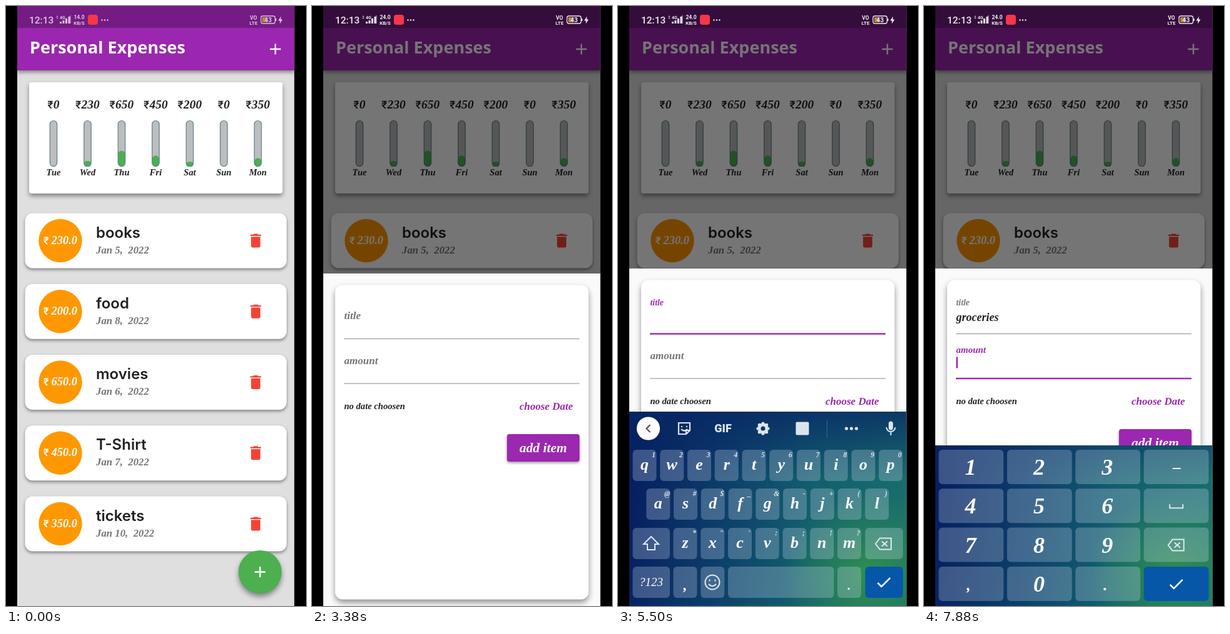
An HTML page with a canvas for the animation above (8 s loop, 480 px wide and 960 px high).

```html
<!DOCTYPE html>
<html lang="en">
<head>
<meta charset="utf-8">
<title>Personal Expenses</title>
<style>
html, body { margin: 0; width: 100%; height: 100%; overflow: hidden; background: #000; }
canvas { display: block; }
</style>
</head>
<body>
<canvas id="stage" width="480" height="960"></canvas>
<script>
const ctx = document.getElementById('stage').getContext('2d');
const LOOP = 8000, TICK = 125;
const LEFT = 18, WIDTH = 443.5;
const PURPLE = '#9c27b0', GREEN = '#4caf50', BLUE = '#0757a8', INK = '#212121';
const DP = 1.23;

const script = (size, weight = 'bold') => `italic ${weight} ${size}px "Liberation Serif", serif`;
const roboto = (size, weight = 500) => `${weight} ${size}px Roboto, sans-serif`;

const items = [
  ['books', 230, 'Jan 5,  2022'], ['food', 200, 'Jan 8,  2022'], ['movies', 650, 'Jan 6,  2022'],
  ['T-Shirt', 450, 'Jan 7,  2022'], ['tickets', 350, 'Jan 10,  2022']
];
const days = [['Tue', 0], ['Wed', 230], ['Thu', 650], ['Fri', 450], ['Sat', 200], ['Sun', 0], ['Mon', 350]];
const total = days.reduce((sum, day) => sum + day[1], 0);

// [letters, hints, left edge, top offset]
const keyRows = [
  ['qwertyuiop', '1234567890', 23.5, 61],
  ['asdfghjkl', '@#$_&-+()', 45.3, 123],
  ['zxcvbnm', '*"\':;!?', 88.5, 186]
];
const PITCH = 43.75, KEY_W = 38, KEY_H = 50;

// [time, text, pressed key]
const typing = [
  [0, '', ''], [5750, '', 'g'], [5875, 'g', 'r'], [6000, 'gr', ''], [6375, 'gr', 'o'],
  [6500, 'gro', ''], [6750, 'gro', 'c'], [6875, 'groc', ''], [7250, 'groceries', '']
];
const suggestions = {
  g: ['g', 'good', 'go'], gr: ['gr', 'grocery', 'groups'], gro: ['gro', 'grocery', 'groups'],
  groc: ['groc', 'groceries', 'grocery'], groceries: ['and', 'for', 'list']
};

const clamp = v => Math.max(0, Math.min(1, v));

function text(str, x, y, font, color, align = 'left') {
  ctx.font = font;
  ctx.fillStyle = color;
  ctx.textAlign = align;
  ctx.fillText(str, x, y);
}

// Centred amount with an upright currency sign
function money(amount, x, y, size, color, gap = 0) {
  const signFont = roboto(size * .88);
  ctx.font = signFont;
  const signWidth = ctx.measureText('₹').width + gap;
  ctx.font = script(size);
  const left = x - (signWidth + ctx.measureText(amount).width) / 2;
  text('₹', left, y, signFont, color);
  text(amount, left + signWidth, y, script(size), color);
}

function rect(x, y, w, h, color) {
  ctx.fillStyle = color;
  ctx.fillRect(x, y, w, h);
}

function box(x, y, w, h, r, fill, stroke, lineWidth = 1) {
  ctx.beginPath();
  ctx.roundRect(x, y, w, h, r);
  if (fill) { ctx.fillStyle = fill; ctx.fill(); }
  if (stroke) { ctx.strokeStyle = stroke; ctx.lineWidth = lineWidth; ctx.stroke(); }
}

function disc(x, y, r, fill, stroke, lineWidth = 1) {
  box(x - r, y - r, 2 * r, 2 * r, r, fill, stroke, lineWidth);
}

function raised(blur, dy, draw) {
  ctx.save();
  ctx.shadowColor = 'rgba(0,0,0,.42)';
  ctx.shadowBlur = blur;
  ctx.shadowOffsetY = dy;
  draw();
  ctx.restore();
}

function icon(x, y, path, color, { scale = 1, stroke = 0 } = {}) {
  ctx.save();
  ctx.translate(x, y);
  ctx.scale(scale, scale);
  const shape = new Path2D(path);
  if (stroke) {
    ctx.strokeStyle = color;
    ctx.lineWidth = stroke;
    ctx.stroke(shape);
  } else {
    ctx.fillStyle = color;
    ctx.fill(shape);
  }
  ctx.restore();
}

const plus = (x, y, color) => icon(x, y, 'M-8.6 0H8.6M0-8.6V8.6', color, { stroke: 2.4 });
const trash = (x, y, color) => icon(x, y,
  'M-6 7c0 1.1.9 2 2 2h8c1.1 0 2-.9 2-2V-5H-6zM7-8H3.5l-1-1h-5l-1 1H-7v2H7z', color, { scale: DP });
const check = (x, y) => icon(x, y, 'M-10 1L-4 7L10-7', '#fff', { stroke: 2.6 });
const backspace = (x, y) => icon(x, y, 'M-13 0L-6-9H12V9H-6zM-3-4L6 4M6-4L-3 4', '#dfe7ee', { stroke: 2 });

function statusBar(t, dimmed) {
  const ink = dimmed ? '#f2eaf4' : '#dcc6e0';
  text('12:13', 37, 28, roboto(15.5), ink);
  icon(82, 18, 'M-2-1L0-3L2-1zM-2 1L0 3L2 1z', ink, { scale: .8 });
  text('4G', 86, 20.5, roboto(7, 700), ink);
  [3, 5, 8, 11].forEach((h, i) => rect(86 + i * 4.5, 28 - h, 3, h, ink));
  ctx.globalAlpha = .4;
  rect(101.5, 15, 2.5, 13, ink);
  ctx.globalAlpha = 1;
  text(t < 750 ? '14.0' : '24.0', 117, 21, roboto(8.5, 700), ink, 'center');
  text('KB/S', 117, 29.5, roboto(7.8, 700), ink, 'center');
  box(131, 14, 16, 16, 4, '#f6364a');
  [153.5, 158, 162.5].forEach(x => disc(x, 22.5, 1.2, ink));
  text('VO', 396, 21.5, roboto(8.5, 700), ink, 'center');
  text('LTE', 396, 29.5, roboto(8, 700), ink, 'center');
  box(408, 16, 22.5, 12, 3, null, ink, 1.3);
  box(410, 18, 7, 8, 1, '#b58a3c');
  rect(431, 20, 1.6, 4, ink);
  text('43', 419.5, 26, roboto(10, 700), ink, 'center');
  icon(439, 22.5, 'M1-6L-3.5 1H-.5L-1 6L3.5-1H.5z', ink);
}

function chart() {
  raised(7, 4, () => box(37, 122, 405.5, 178, 4, '#fff'));
  days.forEach(([name, amount], i) => {
    const x = 76 + i * 54.5;
    money(amount, x, 164, 19.5, INK);
    box(x - 5.7, 183.5, 11.4, 73, 5.7, '#bdbdbd');
    const h = 74 * amount / total;
    if (h) box(x - 5.7, 257 - h, 11.4, h, Math.min(5.7, h / 2), GREEN);
    box(x - 5.7, 183.5, 11.4, 73, 5.7, null, '#56808f', 1.2);
    text(name, x, 270.5, script(14.5), INK, 'center');
  });
}

function homePage(t) {
  rect(LEFT, 0, WIDTH, 960, '#dfdfdf');
  chart();
  items.forEach(([title, amount, date], i) => {
    const y = 331.5 + i * 113.25;
    raised(5, 2.5, () => box(30.5, y, 418.5, 88, 12, '#fff'));
    disc(87, y + 44, 34.7, '#ff9800');
    money(`${amount}.0`, 87, y + 49, 18.5, '#fff', 4);
    text(title, 144, y + 39, '600 24px Inter, sans-serif', INK);
    text(date, 144, y + 64, script(16.8), '#757575');
    trash(399.5, y + 44, '#f44336');
  });

  const glow = t >= 1125 && t <= 1875 ? Math.sin(Math.PI * (t - 1000) / 1000) : 0;
  if (glow) {
    ctx.fillStyle = `rgba(255,255,255,${.15 * glow})`;
    ctx.beginPath();
    ctx.ellipse(240, 960, 270, 36 * glow, 0, 0, 2 * Math.PI);
    ctx.fill();
  }

  raised(8, 5, () => disc(406.5, 905.5, 34.6, GREEN));
  if (t >= 3125) disc(406.5, 905.5, 34.6, 'rgba(255,255,255,.2)');
  plus(406.5, 905.5, '#fff');

  raised(6, 3, () => rect(LEFT, 35, WIDTH, 68, '#9b26af'));
  rect(LEFT, 0, WIDTH, 35, '#741c83');
  text('Personal Expenses', 38, 76, 'bold 27px "Open Sans", sans-serif', '#fff');
  plus(431, 69, '#fff');
}

function field(label, y, value, { focused, float, cursor, composing }) {
  const size = 17 - 3.2 * float;
  text(label, 51.5, y - 31 - 14.5 * float, script(size), focused ? PURPLE : '#757575');
  text(value, 51.5, y - 20, script(18), INK);
  const end = 52 + ctx.measureText(value).width;
  if (composing) rect(51.5, y - 17, end - 52, 1, INK);
  if (cursor) rect(end - .5, y - 34, 2.5, 18, PURPLE);
  const thick = focused ? 2.4 : 1;
  rect(51, y + .5 - thick / 2, 377, thick, focused ? PURPLE : '#8c8c8c');
}

function sheet(t, top, entry) {
  rect(LEFT, top, WIDTH, 960 - top, '#fafafa');
  raised(10, 5, () => box(37, top + 18.5, 405.5, 503, 12, '#fff'));
  const onAmount = t >= 7875, onTitle = t >= 4625 && !onAmount;
  const blinkOff = (t >= 5500 && t < 5750) || (t >= 7625 && t < 7875);
  field('title', top + 104, entry, {
    focused: onTitle, float: clamp((t - 4625) / 200),
    cursor: onTitle && !blinkOff, composing: entry && t < 7250
  });
  field('amount', top + 175.5, '', {
    focused: onAmount, float: onAmount ? clamp((t - 7750) / 200) : 0, cursor: onAmount
  });
  text('no date choosen', 51.5, top + 216.5, script(14.6), INK);
  text('choose Date', 332, top + 217.5, script(17), PURPLE);
  raised(4, 2, () => box(312, top + 257, 116, 44, 4, PURPLE));
  text('add item', 370, top + 285.5, script(21.5), '#fff', 'center');
}

function keyboardBackground(top) {
  const h = 311;
  const base = ctx.createLinearGradient(LEFT, top + 150, 462, top + 200);
  base.addColorStop(0, '#061f60');
  base.addColorStop(.35, '#0d406a');
  base.addColorStop(.65, '#135f6e');
  base.addColorStop(1, '#196e6c');
  rect(LEFT, top, WIDTH, h, base);
  const shade = ctx.createLinearGradient(0, top, 0, top + 110);
  shade.addColorStop(0, 'rgba(7,38,100,.75)');
  shade.addColorStop(1, 'rgba(7,38,100,0)');
  rect(LEFT, top, WIDTH, 110, shade);
  const spot = ctx.createRadialGradient(400, top + 262, 5, 400, top + 262, 135);
  spot.addColorStop(0, 'rgba(52,150,74,.8)');
  spot.addColorStop(1, 'rgba(52,150,74,0)');
  rect(LEFT, top, WIDTH, h, spot);
}

const key = (x, y, w, h = KEY_H, fill = 'rgba(205,222,240,.27)') => box(x, y, w, h, 6, fill);

function toolbar(y, entry, picked) {
  const ink = '#dbe4ec';
  disc(48.5, y, 18.6, '#fff');
  icon(48.5, y, entry ? 'M-3-6L3 0L-3 6' : 'M3-6L-3 0L3 6', '#555', { stroke: 2.2 });
  icon(436.5, y, 'M-3.5-8a3.5 3.5 0 0 1 7 0V-1a3.5 3.5 0 0 1-7 0z', ink);
  icon(436.5, y, 'M-7-2a7 7 0 0 0 14 0M0 5V11', ink, { stroke: 2 });
  if (entry) {
    if (picked) box(180, y - 22, 117, 44, 6, 'rgba(255,255,255,.15)');
    [120, 238, 362].forEach((x, i) =>
      text(suggestions[entry][i], x, y + 7, script(20.5), '#fff', 'center'));
    [175.5, 301].forEach(x => rect(x, y - 14, 1, 28, 'rgba(255,255,255,.2)'));
    return;
  }
  icon(106, y, 'M-9-9H9V3L3 9H-9zM9 3H3V9M-4-4v2M4-4v2M-5 1Q0 6 5 1', ink, { stroke: 2.2 });
  text('GIF', 168, y + 6, roboto(18, 900), ink, 'center');
  for (let i = 0; i < 8; i++) {
    const a = i * Math.PI / 4;
    disc(232 + 8 * Math.cos(a), y + 8 * Math.sin(a), 2.6, ink);
  }
  disc(232, y, 6, null, ink, 5);
  box(284.5, y - 10.5, 21, 21, 2, ink);
  rect(334, y - 14, 1, 28, 'rgba(255,255,255,.2)');
  [365.5, 373.5, 381.5].forEach(x => disc(x, y, 2.6, ink));
}

function popup(letter, hint, x, y) {
  const fill = ctx.createLinearGradient(0, y - 87, 0, y + KEY_H);
  fill.addColorStop(0, '#5b7b92');
  fill.addColorStop(1, '#50809a');
  raised(4, 1, () => box(x - 4, y - 87, KEY_W + 8, 137, 5, fill));
  text(letter, x + KEY_W / 2, y - 42, script(26), '#fff', 'center');
  text(hint, x + 29, y - 25, script(15), '#fff', 'center');
}

function letterKeyboard(top, alpha, entry, pressed, picked) {
  ctx.globalAlpha = alpha;
  keyboardBackground(top);
  ctx.globalAlpha = 1;
  toolbar(top + 27, entry, picked);

  const third = top + 186, last = top + 248;
  key(23.5, third, 59.5);
  icon(53, third + 25, 'M0-11L12 1H6V10H-6V1H-12z', '#dfe7ee', { stroke: 2 });
  key(395.5, third, 60.5);
  backspace(425, third + 25.5);
  key(23.5, last, 59.5);
  text('?123', 53, last + 31, script(19, 'normal'), '#fff', 'center');
  key(88.5, last, KEY_W);
  text(',', 107.5, last + 37, script(24), '#fff', 'center');
  key(132.3, last, KEY_W);
  disc(151, last + 25, 11.5, null, '#dfe7ee', 2);
  icon(151, last + 25, 'M-4.5-4.5v3M4.5-4.5v3M-6 3Q0 9.5 6 3', '#dfe7ee', { stroke: 2 });
  key(176, last, 169.5);
  key(351, last, KEY_W);
  text('.', 370, last + 37, script(22), '#fff', 'center');
  key(395.5, last, 60.5, KEY_H, BLUE);
  check(425.5, last + 25);

  let raisedKey;
  for (const [letters, hints, left, offset] of keyRows) {
    [...letters].forEach((letter, i) => {
      const x = left + i * PITCH, y = top + offset;
      key(x, y, KEY_W);
      text(letter, x + KEY_W / 2, y + 32, script(26), '#fff', 'center');
      text(hints[i], x + KEY_W - 4.5, y + 12, script(11.5), '#dde6ee', 'center');
      if (letter === pressed) raisedKey = [letter, letter === 'o' ? '.' : hints[i], x, y];
    });
  }
  if (raisedKey) popup(...raisedKey);
}

function numberPad() {
  ctx.save();
  ctx.beginPath();
  ctx.rect(LEFT, 703, WIDTH, 257);
  ctx.clip();
  keyboardBackground(649);
  ['123-', '456_', '789<', ',0.>'].forEach((row, r) => [...row].forEach((label, c) => {
    const x = 23.5 + c * 109.4, y = 710 + r * 62.3, cx = x + 52, cy = y + 28;
    key(x, y, 103.8, 55, label === '>' ? BLUE : undefined);
    if (label === '>') check(cx, cy);
    else if (label === '<') backspace(cx, cy);
    else if (label === '_') icon(cx, cy, 'M-10.5-3V3H10.5V-3', '#dfe7ee', { stroke: 2 });
    else if (label === '-') icon(cx, cy, 'M-6 2H7', '#fff', { stroke: 2.2 });
    else if (label === '.' || label === ',') text(label, cx - 4, cy + 10, script(26), '#fff', 'center');
    else text(label, cx - 1, cy + 12, script(36), '#fff', 'center');
  }));
  ctx.restore();
}

function draw(t) {
  rect(0, 0, 480, 960, '#000');
  ctx.save();
  ctx.beginPath();
  ctx.rect(LEFT, 0, WIDTH, 960);
  ctx.clip();

  const open = t >= 3375;
  homePage(t);
  if (open) rect(LEFT, 0, WIDTH, 960, 'rgba(0,0,0,.54)');
  statusBar(t, open);

  if (open) {
    const [, entry, pressed] = typing.filter(step => t >= step[0]).pop();
    sheet(t, t < 3500 ? 428 : 420, entry);
    if (t >= 7875) {
      numberPad();
    } else if (t >= 4625) {
      const p = clamp((t - 4625) / 500);
      letterKeyboard(649 + 311 * (1 - p) ** 2.4, .25 + .75 * p, entry, pressed, t >= 7125 && t < 7250);
    }
  }
  ctx.restore();
}

const start = performance.now();
function frame() {
  const t = (performance.now() - start) % LOOP;
  draw(Math.floor((t + 5) / TICK) * TICK % LOOP);
  requestAnimationFrame(frame);
}
frame();
</script>
</body>
</html>
```
